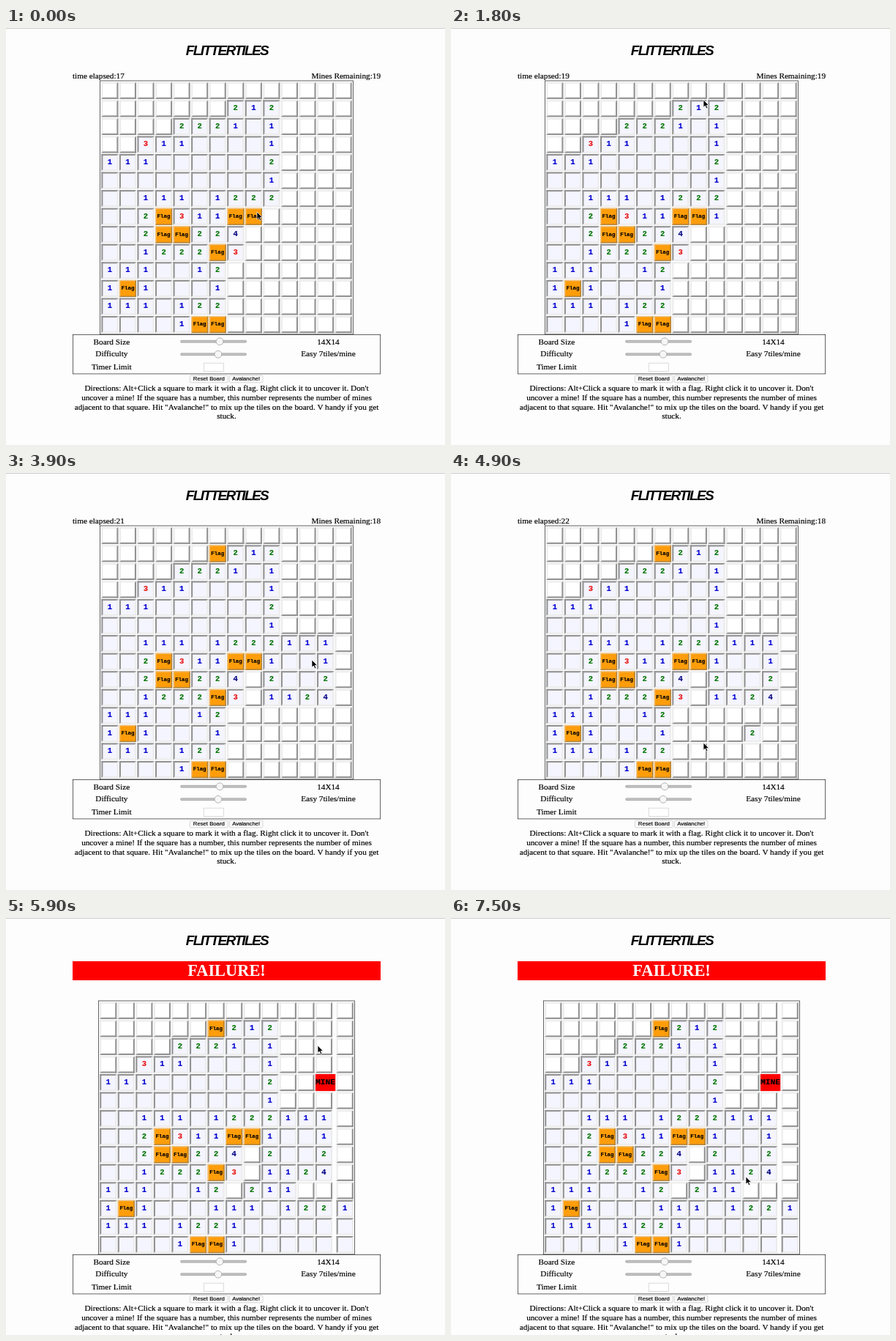
Animation, 600 px wide and 569 px high, one loop 7.6 s. Source, as an HTML page:

```html
<!DOCTYPE html>
<html lang="en">
<head>
<meta charset="utf-8">
<title>Tile board</title>
<style>
html, body { margin: 0; width: 100%; height: 100%; overflow: hidden; background: #fdfdfe; }
body { position: relative; font: 16px/18px "Liberation Serif", "Times New Roman", serif; color: #000; }
div, svg { position: absolute; box-sizing: border-box; }
.text { white-space: pre; text-align: center; transform: translate(-50%, -50%); }
#edge { width: 600px; height: 1px; background: #ccc; }
#title { left: 302px; top: 31px; font: italic bold 19px/24px "Liberation Sans", Arial, sans-serif; letter-spacing: -1.6px; }
#banner { left: 91px; top: 59px; width: 421px; height: 26px; background: #f00; color: #fff;
  font-size: 22.4px; font-weight: bold; line-height: 26px; text-align: center; }
/* The page is laid out 600px wide and shown 421px wide */
#page { left: 91px; top: 59px; width: 600px; height: 727px; transform: scale(.70167); transform-origin: 0 0;
  -webkit-text-stroke: .25px; }
#elapsed { left: 0; top: 0; }
#left { right: 0; top: 0; }
#board { top: 18px; height: 494px; border: 1px solid #222; }
#options { left: 0; top: 512px; width: 600px; height: 77px; border: 1px solid #222; }
.cell { height: 33px; border: 3px solid; border-color: #ececec #929292 #929292 #ececec; background: #fff;
  font: bold 15px/27px "Liberation Mono", "Courier New", monospace; text-align: center; }
.open { background: #f5f5ff; border-color: #929292 #ececec #ececec #929292; }
.flag { background: #ff9d0a; border: 2px solid; border-color: #e9c48c #a9803f #a9803f #e9c48c;
  font-size: 10.6px; line-height: 29px; }
.mine { background: #f00; border: 0; font-size: 16px; line-height: 33px; }
.track { width: 129px; height: 5px; border: 1px solid #999; border-radius: 2px; background: #c4c4c4; }
.thumb { width: 15px; height: 15px; border: 1px solid #999; border-radius: 50%; background: #f6f6f6; }
#limit { left: 255px; top: 567px; width: 40px; height: 17px; border: 1px solid #ccc; background: #fff; }
.button { top: 591px; height: 15px; border: 1px solid #c8c8c8; border-radius: 3px; background: #fafafa;
  font: 11px/13px "Liberation Sans", Arial, sans-serif; text-align: center; white-space: nowrap; }
</style>
</head>
<body>
<div id="edge"></div>
<div id="title" class="text">FLITTERTILES</div>
<div id="banner">FAILURE!</div>
<div id="page">
  <div id="elapsed"></div>
  <div id="left"></div>
  <div id="options"></div>
  <div id="board"></div>
  <div id="limit"></div>
  <div class="button" style="left:228px;width:75px">Reset Board</div>
  <div class="button" style="left:305px;width:66px">Avalanche!</div>
</div>
<svg id="cursor" width="12" height="16" viewBox="-1 -1 12 16">
  <path d="M0 0V10.2L2.4 8 4 11.8 5.8 11 4.2 7.4H7.4Z" stroke="#fff" stroke-width=".7"/>
</svg>
<script>
const LOOP = 7600, STEP = 100, FAIL = 5900, PITCH = 35;
const $ = id => document.getElementById(id);
const page = $('page');

function add(cls, x, y, text = '') {
  const el = document.createElement('div');
  el.className = cls;
  el.style.left = x + 'px';
  el.style.top = y + 'px';
  el.textContent = text;
  page.append(el);
  return el;
}

['Board Size', 'Difficulty', 'Timer Limit'].forEach((s, i) => add('text', 76, 525.5 + 24.5 * i, s));
['14X14', 'Easy 7tiles/mine'].forEach((s, i) => add('text', 498, 525.5 + 24.5 * i, s));
[[286, 525], [283, 550]].forEach(([x, y]) => {
  add('track', 209.5, y - 2.5);
  add('thumb', x - 7.5, y - 7.5);
});
[
  "Directions: Alt+Click a square to mark it with a flag. Right click it to uncover it. Don't",
  'uncover a mine! If the square has a number, this number represents the number of mines',
  'adjacent to that square. Hit "Avalanche!" to mix up the tiles on the board. V handy if you get',
  'stuck.'
].forEach((s, i) => add('text', 300, 616.5 + 18 * i, s));

// # covered, . empty, F flag
const grid = [
  '##############',
  '######F212####',
  '####2221.1####',
  '##311....1####',
  '111......2####',
  '.........1####',
  '..111.1222111#',
  '..2F311FF1..1#',
  '..2FF224#2..2#',
  '..1222F3#1124#',
  '111..12#211###',
  '1F1...111.1221',
  '111.1221......',
  '....1FF1......'
];
const inks = { 1: '#0000d0', 2: '#007400', 3: '#e81010', 4: '#000080' };

// Moment at which a tile gets its final look
function openTime(r, c) {
  if (r === 1 && c === 6) return 2200;
  if (r === 7 && c === 9) return 500;
  if (r === 11 && c === 11) return 4500;
  if (r >= 10 && c >= 7) return 5200;
  if (r >= 6 && c >= 10 || r >= 8 && c === 9) return 3900;
  return 0;
}

const cells = grid.flatMap((row, r) => [...row].map((mark, c) =>
  ({ mark, r, c, at: openTime(r, c), el: add('cell', 0, 21 + PITCH * r) })));

// time, x, y of the pointer
const path = [
  [0, 343, 252], [200, 343, 252], [500, 361, 254], [900, 362, 253], [1300, 374, 150],
  [1800, 345, 99], [2100, 288, 107], [2600, 288, 107], [3100, 320, 185], [3400, 399, 234],
  [3500, 418, 256], [4000, 418, 256], [4400, 416, 266], [4500, 411, 352], [4600, 411, 352],
  [4900, 345, 369], [5200, 345, 371], [5800, 426, 175], [6300, 426, 175], [7500, 403, 354], [7600, 403, 354]
];

function pointer(t) {
  const i = path.findIndex(p => p[0] > t);
  const [t0, x0, y0] = path[i - 1], [t1, x1, y1] = path[i];
  const u = (t - t0) / (t1 - t0), k = u * u * (3 - 2 * u);
  return [x0 + (x1 - x0) * k, y0 + (y1 - y0) * k];
}

// The wide mine tile pushes the centred board 3px out on both sides
function drawCell({ mark, r, c, at, el }, t, failed) {
  const mine = failed && r === 4 && c === 12;
  const shown = t >= at ? mark : '#';
  el.className = 'cell ' + (mine ? 'mine' : shown === 'F' ? 'flag' : shown === '#' ? '' : 'open');
  el.textContent = mine ? 'MINE' : shown === 'F' ? 'Flag' : inks[shown] ? shown : '';
  el.style.color = inks[shown] || '#000';
  el.style.left = 56 + PITCH * c + (failed ? (c > 12 ? 3 : -3) : 0) + 'px';
  el.style.width = (mine ? 39 : 33) + 'px';
}

function draw(t) {
  const failed = t >= FAIL;
  $('banner').hidden = !failed;
  $('elapsed').hidden = $('left').hidden = failed;
  $('elapsed').textContent = 'time elapsed:' + (17 + Math.floor((t + 700) / 1000));
  $('left').textContent = 'Mines Remaining:' + (t < 2200 ? 19 : 18);
  page.style.top = (failed ? 100 : 59) + 'px';
  $('board').style.left = (failed ? 50 : 53) + 'px';
  $('board').style.width = (failed ? 500 : 494) + 'px';
  cells.forEach(cell => drawCell(cell, t, failed));
  const [x, y] = pointer(t);
  $('cursor').style.left = x - 1 + 'px';
  $('cursor').style.top = y - 1.6 + 'px';
}

let last = -1;
function frame(now) {
  const t = Math.floor(now % LOOP / STEP) * STEP;
  if (t !== last) draw(last = t);
  requestAnimationFrame(frame);
}
draw(0);
requestAnimationFrame(frame);
</script>
</body>
</html>
```
